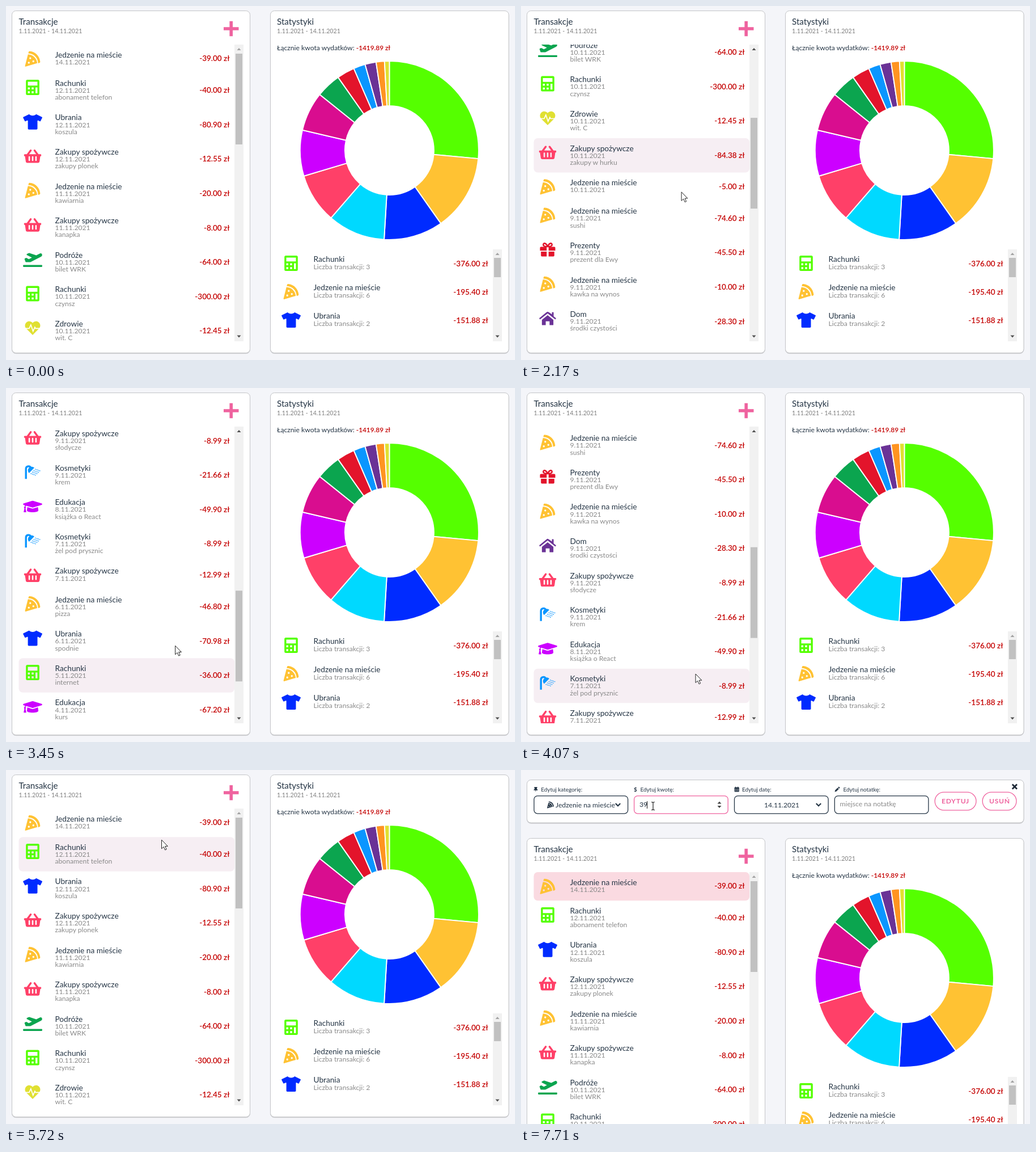
Animation, 898 px wide and 624 px high, one loop 8000 ms. Source, as an HTML page:

```html
<!DOCTYPE html>
<html lang="pl">
<head>
<meta charset="utf-8">
<title>Transakcje</title>
<style>
html, body { margin: 0; width: 100%; height: 100%; overflow: hidden; background: #f4f5f9; }
svg { display: block; width: 898px; height: 624px; font-family: Lato, sans-serif; }
text { fill: #253545; }
.title { font-size: 15.2px; }
.name { font-size: 13.68px; }
.small { font-size: 12.16px; }
.muted { font-size: 12.16px; fill: #8a8a8a; }
.range { font-size: 10.64px; fill: #808080; }
.label { font-size: 9.88px; }
.amount { font-size: 13.5px; font-weight: 600; fill: #c40000; text-anchor: end; }
.total { font-size: 11.8px; font-weight: 600; fill: #c40000; }
.button { font-size: 12.16px; font-weight: 700; fill: #ef639f; letter-spacing: .7px; }
</style>
</head>
<body>
<svg id="stage" viewBox="0 0 898 624"></svg>
<script>
const LOOP = 8000, OPEN = 6140, FOCUS = 7380, LAG = 100;
const INK = '#253545', PINK = '#ef639f';

// Icons: colour, width in a 512 unit high box, markup
const dots = (...points) => points.map(([x, y]) => `M${x} ${y}h0`).join('');
const slot = x => `M${x} 280v112a24 24 0 0 0 48 0V280a24 24 0 0 0-48 0z`;
const key = (x, y, h = 64) => `M${x} ${y}v${h}h64v-${h}z`;
const solid = d => `<path fill-rule="evenodd" d="${d}"/>`;
const ICONS = {
  food: ['#ffc233', 512, solid('M159 0c-16-2-31 9-36 25l-13 44c190 9 321 143 330 331l44-12c16-5 26-20 25-36C492 164 345 13 159 0z') +
    solid('M100 102L1 491c-3 12 8 24 21 20l387-113c-13-161-132-282-309-296z' +
      [[128, 384], [176, 232], [280, 336]].map(([x, y]) => `M${x - 32} ${y}a32 32 0 0 0 64 0a32 32 0 0 0-64 0z`).join(''))],
  bills: ['#55ff00', 448, solid('M48 0H400a48 48 0 0 1 48 48V464a48 48 0 0 1-48 48H48a48 48 0 0 1-48-48V48A48 48 0 0 1 48 0zM64 64v128h320V64z' +
    key(64, 256) + key(192, 256) + key(64, 384) + key(192, 384) + key(320, 256, 192))],
  clothes: ['#002bff', 640, solid('M631 96L437 0C416 28 371 48 320 48S225 28 204 0L9 96c-8 4-11 14-7 22l57 114c4 8 14 11 22 7l57-27c10-5 23 2 23 14V480c0 18 14 32 32 32h256c18 0 32-14 32-32V226c0-12 12-19 23-14l57 28c8 4 18 1 22-7l57-115c4-8 1-17-9-22z')],
  shop: ['#ff4068', 576, solid('M576 216v16c0 13-11 24-24 24h-8l-26 182c-3 24-24 42-47 42H106c-24 0-44-18-47-42L32 256h-8c-13 0-24-11-24-24v-16c0-13 11-24 24-24h67l107-147c11-14 31-17 45-7 14 11 17 31 7 45L171 192h235L326 83c-10-14-7-34 7-45 14-10 34-7 45 7l107 147h67c13 0 24 11 24 24z' +
    slot(152) + slot(264) + slot(376))],
  travel: ['#0ba54f', 640, solid('M624 448H16c-9 0-16 7-16 16v32c0 9 7 16 16 16h608c9 0 16-7 16-16v-32c0-9-7-16-16-16zM81 341c6 7 15 11 25 11h109c17 0 34-4 50-12L597 170c30-15 53-46 36-80C615 54 576 55 546 70L442 124 213 49c-10-4-21-3-30 2l-51 26c-16 8-18 29-4 40l168 82-102 52-74-36c-9-5-20-5-30 0l-28 14c-14 7-18 26-7 38z')],
  health: ['#e0e032', 512, solid('M256 490L40 275C-15 215-12 120 52 64 110 15 195 22 256 86 317 22 402 15 460 64 524 120 527 215 472 275z') +
    '<path d="M0 272H140L196 150 270 366 330 230 352 272H512" fill="none" stroke="#fff" stroke-width="32"/>'],
  gift: ['#e3142b', 512, solid('M32 320H224V480H64a32 32 0 0 1-32-32zM288 320H480V448a32 32 0 0 1-32 32H288zM32 160H224V288H0V192a32 32 0 0 1 32-32zM288 160H480a32 32 0 0 1 32 32V288H288z') +
    '<path d="M256 150C210 30 110 10 110 90 110 150 200 150 256 150 312 150 402 150 402 90 402 10 302 30 256 150" fill="none" stroke="currentColor" stroke-width="48"/>'],
  home: ['#6a3296', 576, solid('M288 148L96 300V464a16 16 0 0 0 16 16H224V352H352V480H464a16 16 0 0 0 16-16V300z') +
    solid('M571 252L488 183V56a12 12 0 0 0-12-12H432V117L318 43a48 48 0 0 0-61 0L4 252 32 288 280 92q8-6 16 0L544 288z')],
  beauty: ['#0a96ff', 512, '<path d="M32 480V144C32 50 150 30 190 100" fill="none" stroke="currentColor" stroke-width="64"/>' +
    solid('M136 284L312 108A124 124 0 0 0 136 284z') +
    `<path stroke="currentColor" stroke-width="32" stroke-linecap="round" d="${dots([350, 160], [302, 208], [254, 256], [206, 304], [400, 176], [350, 224], [302, 272], [254, 320], [446, 192], [398, 240], [350, 288], [302, 336], [494, 208], [446, 256], [398, 304], [350, 352])}"/>`],
  school: ['#cc00ff', 640, solid('M622 153L343 67a80 80 0 0 0-46 0L18 153c-24 8-24 40 0 48l48 15c-10 13-17 29-17 46-10 6-17 16-17 28 0 11 6 21 15 26L21 429c-2 10 5 19 15 19h55c11 0 18-9 15-19L81 317c9-5 15-15 15-26 0-12-7-22-16-27 1-15 9-29 22-38l195 60a80 80 0 0 0 47 0l278-86c24-7 24-40 0-47z') +
    solid('M352 318c-32 9-58 2-64 0L144 273 128 384c0 35 86 64 192 64s192-29 192-64L497 273z')],
};
const CATEGORY = {
  food: 'Jedzenie na mieście', bills: 'Rachunki', clothes: 'Ubrania', shop: 'Zakupy spożywcze', travel: 'Podróże',
  health: 'Zdrowie', gift: 'Prezenty', home: 'Dom', beauty: 'Kosmetyki', school: 'Edukacja',
};
const ROWS = [
  ['food', 14, '39.00', ''], ['bills', 12, '40.00', 'abonament telefon'], ['clothes', 12, '80.90', 'koszula'],
  ['shop', 12, '12.55', 'zakupy plonek'], ['food', 11, '20.00', 'kawiarnia'], ['shop', 11, '8.00', 'kanapka'],
  ['travel', 10, '64.00', 'bilet WRK'], ['bills', 10, '300.00', 'czynsz'], ['health', 10, '12.45', 'wit. C'],
  ['shop', 10, '84.38', 'zakupy w hurku'], ['food', 10, '5.00', ''], ['food', 9, '74.60', 'sushi'],
  ['gift', 9, '45.50', 'prezent dla Ewy'], ['food', 9, '10.00', 'kawka na wynos'], ['home', 9, '28.30', 'środki czystości'],
  ['shop', 9, '8.99', 'słodycze'], ['beauty', 9, '21.66', 'krem'], ['school', 8, '49.90', 'książka o React'],
  ['beauty', 7, '8.99', 'żel pod prysznic'], ['shop', 7, '12.99', ''], ['food', 6, '46.80', 'pizza'],
  ['clothes', 6, '70.98', 'spodnie'], ['bills', 5, '36.00', 'internet'], ['school', 4, '67.20', 'kurs'],
  ['school', 3, '30.00', 'zeszyty'], ['travel', 2, '12.00', 'bilet'],
];
const SLICES = [
  ['#55ff00', 95.33], ['#ffc233', 144.87], ['#002bff', 183.4], ['#00d9ff', 220.9], ['#ff4068', 253.3], ['#cc00ff', 283.1],
  ['#d90d8f', 308.7], ['#0ba54f', 324.9], ['#e3142b', 336.5], ['#0a96ff', 344.2], ['#6a3296', 351.4], ['#ff9421', 356.85], ['#e0e032', 360],
];

const text = (cls, x, y, value, extra = '') => `<text class="${cls}" x="${x}" y="${y}" ${extra}>${value}</text>`;
const rect = (x, y, w, h, r, attrs) => `<rect x="${x}" y="${y}" width="${w}" height="${h}" rx="${r}" ${attrs}/>`;
const line = (d, color, width, extra = '') => `<path d="${d}" fill="none" stroke="${color}" stroke-width="${width}" ${extra}/>`;
const card = (x, y, w, h) => rect(x, y + 1.2, w, h, 7, 'fill="#c4c5c8" stroke="#d2d3d6"') + rect(x, y, w, h, 7, 'fill="#fff" stroke="#c3c4c7"');
function icon(name, x, y, size = 27, color = ICONS[name][0]) {
  const k = size / 512;
  return `<g transform="translate(${x - ICONS[name][1] * k / 2} ${y - size / 2}) scale(${k})" fill="${color}" color="${color}">${ICONS[name][2]}</g>`;
}

// Rows without a note are shorter
const rowHeight = i => ROWS[i][3] ? 60.57 : 50.3;
const rowTop = i => ROWS.slice(0, i).reduce((top, _, j) => top + rowHeight(j), 68);
function row([kind, day, sum, note], i) {
  const y = rowTop(i);
  return icon(kind, 47, y + 25.3) + text('name', 86.5, y + 22.6, CATEGORY[kind]) +
    text('muted', 86.5, y + 34.7, day + '.11.2021') + text('muted', 86.5, y + 46.9, note) +
    text('amount', 394.5, y + (note ? 35 : 29.4), `-${sum} zł`);
}
function stat(kind, count, sum, i) {
  const y = 428 + 50 * i;
  return icon(kind, 503, y + 25.5) + text('name', 542.5, y + 23.2, CATEGORY[kind]) +
    text('muted', 542.5, y + 36, 'Liczba transakcji: ' + count) + text('amount', 850.5, y + 30.6, `-${sum} zł`);
}
function scrollbar(x, y, h, thumbY, thumbH, id) {
  const mid = x + 8, end = y + h - 8.5;
  return rect(x, y, 16, h, 0, 'fill="#f1f1f1"') + rect(x + 2, thumbY, 12, thumbH, 0, `id="${id}Thumb" fill="#c1c1c1"`) +
    `<path id="${id}Up" d="M${mid - 3.5} ${y + 10}h7l-3.5-4z" fill="#a3a3a3"/><path d="M${mid - 3.5} ${end - 2}h7l-3.5 4z" fill="#505050"/>`;
}
function donut(cx, cy, outer, inner) {
  const point = (r, deg) => {
    const a = deg * Math.PI / 180;
    return `${(cx + r * Math.sin(a)).toFixed(2)} ${(cy - r * Math.cos(a)).toFixed(2)}`;
  };
  return SLICES.map(([color, to], i) => {
    const from = i ? SLICES[i - 1][1] : 0;
    return `<path d="M${point(outer, from)}A${outer} ${outer} 0 0 1 ${point(outer, to)}L${point(inner, to)}A${inner} ${inner} 0 0 0 ${point(inner, from)}z" fill="${color}" stroke="#fff" stroke-width="1.9"/>`;
  }).join('');
}

const range = '1.11.2021 - 14.11.2021';
const page = `<g id="page">
  ${card(10.5, 8.5, 420, 603)}${card(466.5, 8.5, 420.5, 603)}
  ${text('title', 22.5, 33, 'Transakcje')}${text('range', 22.5, 48.2, range)}
  ${line('M384 40h26.5M397.2 26.8v26.5', PINK, 5.6)}
  <g clip-path="url(#listClip)"><g id="list">
    ${rect(22.5, 0, 380.5, 60.57, 7, 'id="hover" fill="#f6eef3"')}
    ${rect(22.5, 68, 380.5, 50.3, 7, 'id="chosen" fill="#fadae1"')}
    ${ROWS.map(row).join('')}
  </g></g>
  ${line('M23 119H402', '#333', 1, 'id="outline" stroke-dasharray="1 1"')}
  ${scrollbar(403, 68, 523, 84, 160, 'list')}
  ${text('title', 478, 33, 'Statystyki')}${text('range', 478, 48.2, range)}
  ${text('small', 478, 78.3, 'Łącznie kwota wydatków: <tspan class="total">-1419.89 zł</tspan>')}
  ${donut(676.4, 254.5, 157.5, 78.5)}
  <g clip-path="url(#statClip)">${stat('bills', 3, '376.00', 0)}${stat('food', 6, '195.40', 1)}${stat('clothes', 2, '151.88', 2)}</g>
  ${scrollbar(859, 429, 162, 444, 34, 'stat')}
</g>`;

const field = (x, id = '') => rect(x, 45.6, 165.6, 31.2, 6, `${id && `id="${id}"`} fill="#fff" stroke="${INK}" stroke-width="1.3"`);
const chevron = x => line(`M${x - 4.2} 59l4.2 4.2 4.2-4.2`, INK, 2.2);
const button = (x, w, label) => rect(x, 39.2, w, 31.6, 15.8, `fill="#fff" stroke="${PINK}" stroke-width="1.3"`) + text('button', x + 11.8, 59.4, label);
const panel = `<g id="panel">
  ${card(10.5, 17.5, 876.5, 75.5)}
  <path d="M23.3 30h5.4v1.4h-.8l.4 2.4q1.3.6 1.3 1.9h-3l-.6 3.2-.6-3.2h-3q0-1.3 1.3-1.9l.4-2.4h-.8z" fill="${INK}"/>
  ${text('label', 35.3, 37.6, 'Edytuj kategorię:')}
  ${text('label', 199, 37.8, '$', 'font-weight="700"')}${text('label', 210.5, 37.6, 'Edytuj kwotę:')}
  ${rect(376.5, 30.6, 8.4, 8, 1, `fill="${INK}"`)}${line('M378.7 29.5v2M382.7 29.5v2', INK, 1.3)}${line('M377.5 34h6.5M377.5 36.2h6.5', '#fff', .8, 'stroke-dasharray="1.5 1"')}
  ${text('label', 390, 37.6, 'Edytuj datę:')}
  <path d="M553.5 38.5l.7-2.8 4.4-4.4 2.1 2.1-4.4 4.4zM559.2 30.7l1-1q.6-.4 1.1 0l1 1q.5.5 0 1.1l-1 1z" fill="${INK}"/>
  ${text('label', 568.5, 37.6, 'Edytuj notatkę:')}
  ${field(23)}${field(199.6, 'sumField')}${field(376.5)}${field(553.3)}
  ${icon('food', 52, 61.5, 12, INK)}${text('small', 61, 65.8, CATEGORY.food)}${chevron(171)}
  ${text('small', 209, 65.2, '39')}${text('small', 429, 65.8, '14.11.2021')}${chevron(525)}
  ${text('muted', 562.5, 64.3, 'miejsce na notatkę')}
  ${button(730.2, 72.8, 'EDYTUJ')}${button(814.2, 59.8, 'USUŃ')}
  ${line('M866.8 25.3l8.2 8.2M875 25.3l-8.2 8.2', '#1d2835', 2.7)}
  <path id="spinner" d="M346.5 59.5h7l-3.5-4zM346.5 63h7l-3.5 4z" fill="#444"/>
  ${line('M222.5 55v13', '#111', 1, 'id="caret"')}
</g>`;

const cursors = `<g id="cursor">
  <path id="arrow" d="M0 0V15.5l3.6-3.3 2.5 5.6 2.5-1.1-2.5-5.5h4.7z" fill="#fff" stroke="#222" stroke-width="1"/>
  <path id="hand" d="M-1.5 1.5Q0-1 1.5 1.5V8q1.5-1.5 3 .3 1.6-1.2 2.8.5 2-.8 2.5 1.2V14q0 3-2 5v2.5H-1.5V19Q-5 15-7 11.5-6.5 9-4 10.5L-1.5 13z" fill="#fff" stroke="#222" stroke-width="1.1"/>
  ${line('M-3-6.5q3 0 3 1.5 0-1.5 3-1.5M0-5V6M-3 7.5q3 0 3-1.5 0 1.5 3 1.5', '#222', 1.2, 'id="beam"')}
</g>`;

const $ = id => document.getElementById(id);
$('stage').innerHTML = `<clipPath id="listClip"><rect x="20" y="68" width="383" height="523"/></clipPath>
  <clipPath id="statClip"><rect x="478" y="429" width="381" height="162"/></clipPath>` + page + panel + cursors;

// Steps: time, then values; the wheel rests briefly between pulls
const SCROLL = [[880, 0], [1150, 95], [1690, 95], [2640, 638], [2700, 638], [3200, 935], [3350, 935],
  [4060, 643], [4140, 643], [4950, 95], [5020, 95], [5290, 0]];
const POINTER = [[70, 300, 470], [550, 285, 190], [880, 285, 190], [1600, 279, 261], [1690, 279, 261], [2640, 287, 393], [2700, 287, 393],
  [4060, 308, 504], [4140, 308, 504], [4950, 285, 306], [5020, 285, 306], [5310, 280, 157], [5530, 280, 157], [5880, 270, 95],
  [6240, 270, 95], [6600, 142.5, 76], [6930, 142.5, 76], [7320, 233, 63]];

function sample(steps, t, column = 1) {
  const next = steps.findIndex(step => step[0] > t);
  if (next === 0) return steps[0][column];
  if (next < 0) return steps[steps.length - 1][column];
  const a = steps[next - 1], b = steps[next];
  return a[column] + (b[column] - a[column]) * (t - a[0]) / (b[0] - a[0]);
}
const set = (id, name, value) => $(id).setAttribute(name, value);
const show = (id, on) => set(id, 'visibility', on ? 'visible' : 'hidden');

function draw(t) {
  const open = t >= OPEN, focus = t >= FOCUS;
  const scroll = sample(SCROLL, t), x = sample(POINTER, t), y = sample(POINTER, t, 2);

  set('page', 'transform', `translate(0 ${open ? 112 : 0})`);
  set('list', 'transform', `translate(0 ${-scroll})`);
  set('listThumb', 'y', 84 + scroll / 3.27);
  set('listUp', 'fill', scroll > 0 ? '#505050' : '#a3a3a3');

  // The hovered row trails behind the scrolling
  const at = y + sample(SCROLL, t - LAG);
  const hovered = Math.max(0, ROWS.findIndex((_, i) => at < rowTop(i) + rowHeight(i)));
  show('hover', !open && t >= 70);
  set('hover', 'y', rowTop(hovered));
  set('hover', 'height', rowHeight(hovered));

  show('chosen', open);
  show('outline', open && !focus);
  show('panel', open);
  const inSum = open && x > 199 && y < 77;
  set('sumField', 'stroke', focus ? PINK : INK);
  show('spinner', inSum);
  show('caret', focus);

  const inSelect = open && x < 189 && y < 78;
  set('cursor', 'transform', `translate(${x} ${y})`);
  show('arrow', t >= 70 && !inSum && !inSelect);
  show('hand', inSelect);
  show('beam', inSum);
}

const start = performance.now();
function frame() {
  draw((performance.now() - start) % LOOP);
  requestAnimationFrame(frame);
}
frame();
</script>
</body>
</html>
```
